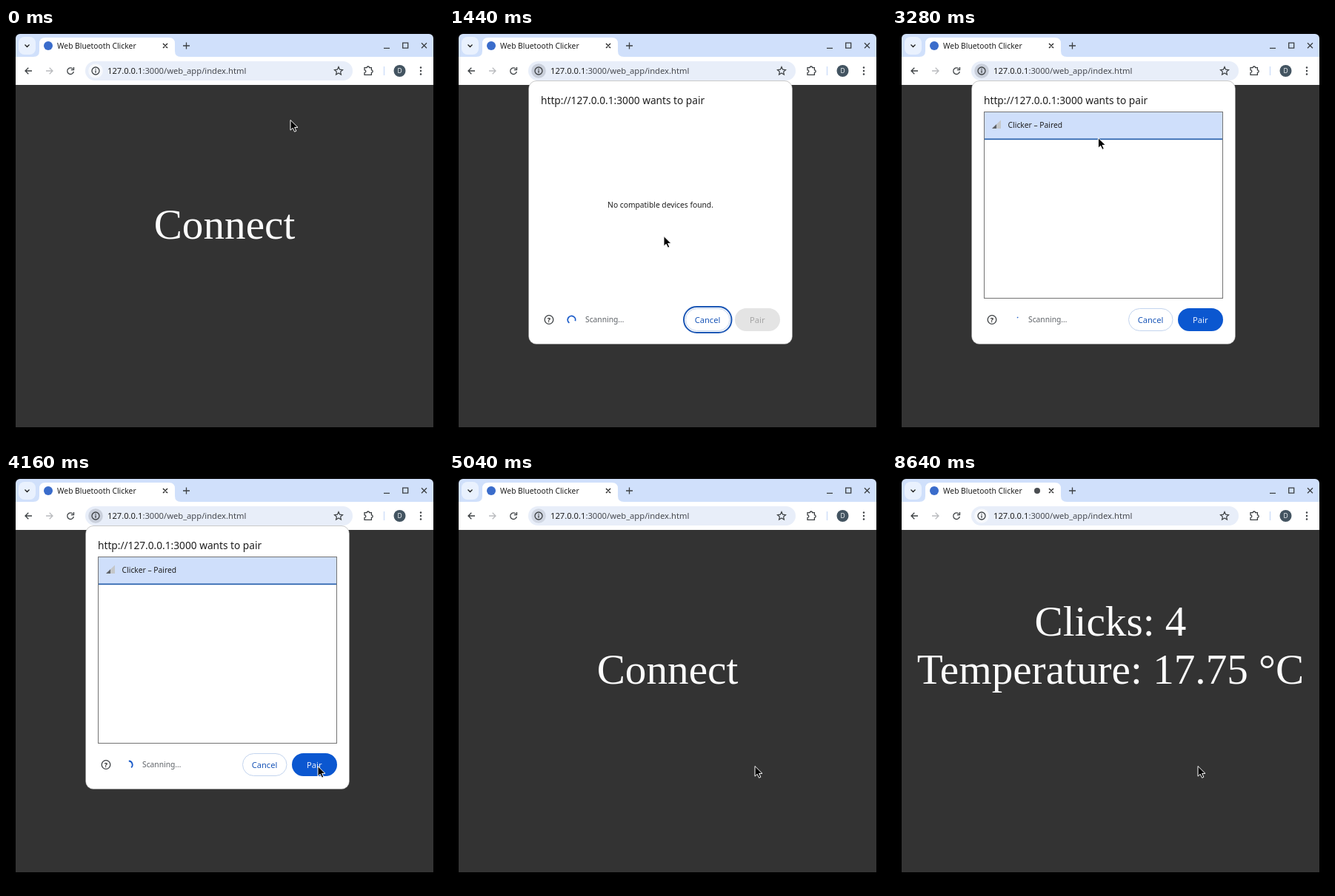
Recreate the animation shown at these times as an HTML page. Size 590 by 564 pixels, loop 8720 ms.

```html
<!DOCTYPE html>
<html lang="en">
<head>
<meta charset="utf-8">
<title>Web Bluetooth Clicker</title>
<style>
  html, body { margin: 0; width: 100%; height: 100%; overflow: hidden; background: #000; }
  svg { display: block; }
  text { font-family: "Noto Sans", "Open Sans", sans-serif; fill: #1f1f1f; white-space: pre; }
  .small { font-size: 10.28px; }
  .label { font-size: 11.15px; font-weight: 500; text-anchor: middle; }
  .big { font: 57.2px "Liberation Serif", "Times New Roman", serif; fill: #fcfcfc; text-anchor: middle; }
  .icon { fill: none; stroke: #3c4043; stroke-width: 1.3; }
</style>
</head>
<body>
<svg width="590" height="564" viewBox="0 0 590 564">
  <rect width="590" height="564" fill="#000"/>

  <!-- window frame -->
  <path d="M13 540V14a6 6 0 0 1 6-6H571a6 6 0 0 1 6 6V540Z" fill="#333"/>
  <path d="M13 40V14a6 6 0 0 1 6-6H571a6 6 0 0 1 6 6V40Z" fill="#d0e0fb"/>
  <rect x="13" y="39" width="564" height="38" fill="#fff"/>
  <path d="M37 39q8 0 8-8V21q0-8 8-8H220q8 0 8 8V31q0 8 8 8Z" fill="#fff"/>
  <rect x="17" y="12" width="23" height="24" rx="8" fill="#e9f1fe"/>
  <circle cx="57" cy="24" r="6" fill="#3a6ccb"/>
  <text class="small" x="69" y="27.7">Web Bluetooth Clicker</text>
  <circle id="badge" cx="196" cy="24" r="4" fill="#4a4d51"/>
  <g class="icon">
    <path d="M25.5 22.5l3 3 3-3M212 21l6 6m0-6l-6 6" stroke="#1f1f1f"/>
    <path d="M239 24h9M243.500 19.500v9M510 27.300h8M535.700 20.200h7v7h-7zM561 20.300l7 7m0-7l-7 7"/>
  </g>

  <!-- toolbar -->
  <rect x="107" y="45" width="361" height="26" rx="13" fill="#e8eef9"/>
  <circle id="site" cx="121" cy="58" r="9.800"/>
  <g class="icon">
    <path d="M35 58H26m4.300-4.300L26 58l4.300 4.300"/>
    <path d="M54 58h9m-4.300-4.300L63 58l-4.300 4.300" stroke="#b9bbbe"/>
    <path d="M90.300 55.300A4.300 4.300 0 1 0 91.300 59M91.500 53v3.700h-3.700"/>
    <circle cx="121" cy="58" r="5"/>
    <path d="M121 57.300v3.500M121 54.900v1.400"/>
    <path d="M449 52.600l1.600 3.600 3.900.4-2.900 2.600.8 3.800-3.400-2-3.400 2 .8-3.800-2.900-2.600 3.900-.4z" stroke-width="1.200"/>
    <path d="M484 53.700h3.200a1.700 1.700 0 0 1 3.400 0h2.800v3.100a1.700 1.700 0 0 1 0 3.500v3.100H484v-3a1.800 1.800 0 0 0 0-3.600z"/>
    <path d="M510.500 52v12" stroke="#cbdcf8"/>
  </g>
  <text x="137" y="62" font-size="11.2">127.0.0.1<tspan fill="#474a50">:3000/web_app/index.html</tspan></text>
  <circle cx="531.500" cy="58" r="8" fill="#435461"/>
  <text x="531.500" y="61.200" font-size="8.500" text-anchor="middle" style="fill:#eef2f5">D</text>
  <g fill="#3c4043">
    <circle cx="560" cy="53.500" r="1.200"/><circle cx="560" cy="58" r="1.200"/><circle cx="560" cy="62.500" r="1.200"/>
  </g>

  <!-- page -->
  <text class="big" id="upper" x="295" y="219.500"></text>
  <text class="big" id="lower" x="295" y="285.300"></text>

  <!-- pairing dialog -->
  <g id="dialog">
    <rect x="107.500" y="71.500" width="356" height="356" rx="10.500" fill="#fff" stroke="#888" stroke-opacity=".45"/>
    <text x="124" y="102.700" font-size="13.700" font-weight="500">http://127.0.0.1:3000 wants to pair</text>
    <text class="small" id="empty" x="285.500" y="243" text-anchor="middle">No compatible devices found.</text>
    <g id="list">
      <rect x="124.500" y="113.500" width="322" height="252" fill="#fff" stroke="#747474"/>
      <g id="row">
        <rect x="125" y="114" width="321" height="36" fill="#cfdffb"/>
        <rect x="125" y="149.500" width="321" height="1.700" fill="#2860ac"/>
      </g>
      <path d="M135 136L147 124.500V136Z" fill="#c4c7ca"/>
      <path d="M135 136L141 130.200V136Z" fill="#5f6368"/>
      <text class="small" x="156.600" y="134.600">Clicker – Paired</text>
    </g>
    <circle class="icon" cx="135" cy="394.500" r="5.800"/>
    <text x="135" y="397.800" font-size="9" font-weight="600" text-anchor="middle">?</text>
    <path id="spinner" fill="none" stroke="#1a5bc9" stroke-width="1.800"/>
    <text class="small" x="184" y="398" style="fill:#5f6368">Scanning…</text>
    <rect id="ring" x="317" y="377" width="64.500" height="35" rx="17.500" fill="none" stroke="#1c57b5" stroke-width="2"/>
    <rect x="319.500" y="379.500" width="59.500" height="30" rx="15" fill="#fff" stroke="#c3d4ee"/>
    <text class="label" x="349" y="398.500" style="fill:#1a56b8">Cancel</text>
    <rect id="pair" x="386" y="379" width="61" height="31" rx="15.500"/>
    <text class="label" id="pairText" x="416.300" y="398.500">Pair</text>
  </g>

  <path id="cursor" d="M0 .5V14.200L3.200 11.300 5.600 16.300 7.900 15.200 5.600 10.400H10Z"
        fill="#000" stroke="#fff" stroke-width="1" stroke-linejoin="round"/>
</svg>
<script>
const LOOP = 8720, STEP = 80;
const el = id => document.getElementById(id);
const show = (id, on) => el(id).setAttribute("visibility", on ? "inherit" : "hidden");

// time, x, y
const path = [
  [0, 384, 124], [80, 384, 124], [880, 290, 281], [1920, 290, 281], [2320, 304, 202],
  [2800, 272, 137], [3200, 272, 137], [3840, 421, 396], [4240, 421, 396],
  [4560, 413, 396], [LOOP, 413, 396]
];
// time, opacity, scale
const fades = [
  [0, 0, 1], [1280, .16, .958], [1360, .85, .993], [1440, 1, 1],
  [4800, .7, .985], [4880, .15, .958], [4960, 0, 1]
];
// time, upper line, lower line
const pages = [
  [0, "", "Connect"],
  ...[6560, 6800, 7280, 7760].map((t, i) => [t, `Clicks: ${i + 1}`, "Temperature: 17.75 °C"])
];
const siteFills = [[0, "#f7f9fd"], [1360, "#c9cfdb"], [4960, "#d1d7e3"], [5120, "#e3e9f3"], [5280, "#f7f9fd"]];

const at = (table, t) => table.findLast(row => row[0] <= t);

function cursorAt(t) {
  const i = path.findIndex(p => p[0] > t);
  const [t0, x0, y0] = path[i - 1], [t1, x1, y1] = path[i];
  const u = (t - t0) / (t1 - t0), k = u * u * (3 - 2 * u);
  return [x0 + (x1 - x0) * k, y0 + (y1 - y0) * k];
}

function arc(t) {
  const rad = Math.PI / 180, r = 5.2;
  const mid = (270 + .4293 * (t - 2320)) * rad;
  const half = (137 + 130 * Math.cos(((t - 2320) / 1250 * 360 - 78) * rad)) / 2 * rad;
  const point = a => `${165.5 + r * Math.cos(a)} ${394.7 + r * Math.sin(a)}`;
  return `M${point(mid - half)}A${r} ${r} 0 ${half > Math.PI / 2 ? 1 : 0} 1 ${point(mid + half)}`;
}

function draw(t) {
  const [, upper, lower] = at(pages, t);
  el("upper").textContent = upper;
  el("lower").textContent = lower;
  show("badge", t >= 6560);
  el("site").setAttribute("fill", at(siteFills, t)[1]);

  const [, opacity, scale] = at(fades, t);
  el("dialog").setAttribute("opacity", opacity);
  el("dialog").setAttribute("transform", `translate(285.5 249.500) scale(${scale}) translate(-285.5 -249.500)`);
  // the page heading stays above the dialog while it is still faint
  const faint = opacity < .5;
  el("dialog").parentNode.insertBefore(el("dialog"), faint ? el("upper") : el("cursor"));

  const picked = t >= 2960;
  show("empty", t < 1600);
  show("list", t >= 1600);
  show("row", picked);
  show("ring", t < 3040);
  el("pair").setAttribute("fill", picked ? "#0b57d0" : "#e4e4e4");
  el("pairText").style.fill = picked ? "#e8f0ff" : "#a5a5a5";
  el("spinner").setAttribute("d", arc(t));
  el("cursor").setAttribute("transform", `translate(${cursorAt(t)})`);
}

const start = performance.now();
let last = -1;
function tick() {
  const t = Math.floor((performance.now() - start) % LOOP / STEP) * STEP;
  if (t !== last) draw(last = t);
  requestAnimationFrame(tick);
}
tick();
</script>
</body>
</html>
```
